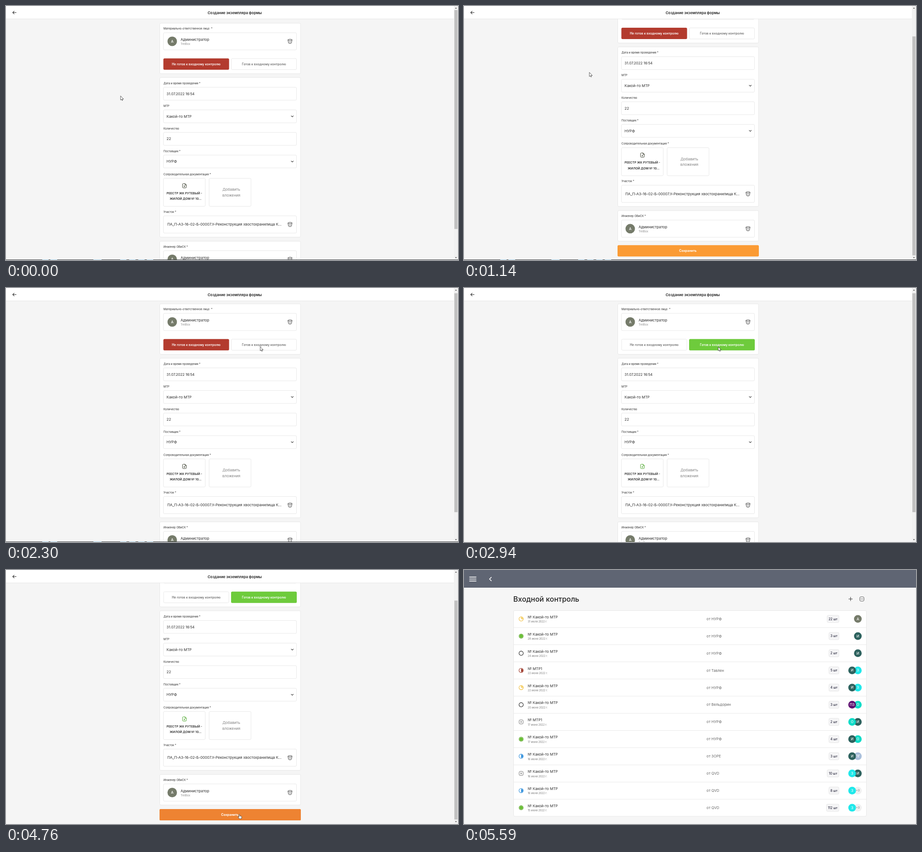
Recreate the animation shown at these times as an HTML page. Size 998 by 561 pixels, loop 5620 ms.

```html
<!DOCTYPE html>
<html lang="ru">
<head>
<meta charset="utf-8">
<style>
html, body { margin: 0; width: 100%; height: 100%; overflow: hidden; background: #f5f5f5; }
svg { display: block; width: 998px; height: 561px; font-family: Inter, "Open Sans", sans-serif; }
</style>
</head>
<body>
<svg id="stage" viewBox="0 0 998 561"></svg>
<script>
const LOOP = 5620, RED = '#b33b2e', GREEN = '#6ecb3c', INK = '#2b2b2b', GREY = '#808080';

// Drawing helpers; y of a text is the middle of its capitals
const text = (x, y, str, size = 8, fill = INK, weight = 400, anchor = 'start') =>
  `<text x="${x}" y="${y + size * .36}" font-size="${size}" fill="${fill}" font-weight="${weight}" text-anchor="${anchor}">${str}</text>`;
const mid = (x, y, str, size, fill, weight) => text(x, y, str, size, fill, weight, 'middle');
const rect = (x, y, w, h, fill, extra = '') =>
  `<rect x="${x}" y="${y}" width="${w}" height="${h}" fill="${fill}" ${extra}/>`;
const box = (x, y, w, h, fill = '#fff', stroke = '#e2e2e2', r = 2.5) =>
  rect(x + .5, y + .5, w - 1, h - 1, fill, `stroke="${stroke}" stroke-width=".8" rx="${r}"`);
const line = (d, stroke = INK, width = 1, fill = 'none') =>
  `<path d="${d}" fill="${fill}" stroke="${stroke}" stroke-width="${width}" stroke-linecap="round" stroke-linejoin="round"/>`;
const disc = (x, y, r, fill, extra = '') => `<circle cx="${x}" cy="${y}" r="${r}" fill="${fill}" ${extra}/>`;
const at = (x, y, body) => `<g transform="translate(${x} ${y})">${body}</g>`;
const layer = (id, body) => `<g id="${id}">${body}</g>`;

// Form page
const label = (y, str) => text(347.8, y, str, 6);
const chevron = y => line(`M629.8 ${y - 1.1}l2.3 2.3 2.3-2.3`, '#333', 1.1);
const field = (y, str) => box(347, y, 295, 29.5) + text(354.6, y + 14.7, str, str.includes(':') ? 7.8 : 8);
const trash = y => at(627, y, line('M-4.6-3.3C-4.6-5.2 4.6-5.2 4.6-3.3S-4.6-1.4-4.6-3.3L-3.3 3.6C-3 5.2 3 5.2 3.3 3.6L4.6-3.3', '#444', .9, '#eee')
  + line('M-1.4 0l.3 3M1.4 0l-.3 3', '#777', .6));
const person = y => box(347, y - 19.5, 295, 39) + disc(367, y, 10.5, '#757b6a') + mid(367, y, 'А', 8, '#fff', 500)
  + text(385.4, y - 3.8, 'Администратор', 8.2) + text(385.4, y + 6.2, 'TrelBox', 6, '#8c8c8c') + trash(y);
const choice = (x, fill, id, str) => box(x, 115.5, 145, 25.5) + mid(x + 72.5, 128.4, str, 6.95, '#707070', 600)
  + layer(id, rect(x, 115.7, 145, 25, fill, 'rx="2.5"') + mid(x + 72.5, 128.4, str, 6.95, '#fff', 600));
const docIcon = line('M-1-4.8h2.4L4.2-2v5a1.8 1.8 0 0 1-1.8 1.8h-4.8A1.8 1.8 0 0 1-4.2 3v-6a1.8 1.8 0 0 1 1.8-1.8zM1.2-4.6v2.8h2.8M-1.3-.2l2.6 2.8M1.3-.2l-2.6 2.8', 'currentColor', 1);

const form =
  box(339, 37.5, 312, 112.5) + label(50, 'Материально-ответственное лицо&#160; *') + person(78)
  + choice(347.5, RED, 'notReady', 'Не готов к входному контролю')
  + choice(497, GREEN, 'ready', 'Готов к входному контролю')
  + box(339, 157.5, 312, 353.5)
  + label(170.5, 'Дата и время проведения *') + field(179, '31.07.2022 16:54')
  + label(220.5, 'МТР') + field(229, 'Какой-то МТР') + chevron(243.7)
  + label(270.5, 'Количество') + field(278.7, '22')
  + label(320.5, 'Поставщик *') + field(328.7, 'НУРФ') + chevron(343.4)
  + label(371.5, 'Сопроводительная документация *')
  + box(347, 380, 93.5, 63) + layer('doc', at(394, 397, docIcon))
  + mid(393.8, 413.3, 'РЕЕСТР ЖК РУТЕВЫЙ -', 6.7, INK, 600) + mid(396.5, 426, 'ЖИЛОЙ ДОМ № 10...', 6.7, INK, 600)
  + box(448, 380, 93.5, 63) + mid(497.6, 405.3, 'Добавить', 8.2, GREY) + mid(497.6, 418, 'вложения', 8.2, GREY)
  + label(455, 'Участок *') + box(347, 463, 295, 39)
  + text(356.2, 482.6, 'ПА_П-АЗ-16-02-Б-00007.У-Реконструкция хвостохранилища К...', 7.96) + trash(482.5)
  + box(339, 519, 312, 68.5) + label(531.8, 'Инженер ОВиСК *') + person(559.5)
  + rect(339, 596, 312, 25, '#fb9b34', 'rx="2.5"') + rect(339, 596, 312, 25, '#ee8332', 'rx="2.5" id="pressed"')
  + mid(494.4, 608.4, 'Сохранить', 7.05, '#fff', 700);

const header = rect(0, 0, 989, 28.5, '#fff') + rect(0, 28, 989, .8, '#e4e4e4')
  + line('M22.5 14.5h-7.6M18 11.3l-3.2 3.2 3.2 3.2', '#333', 1.1)
  + mid(505, 14.8, 'Создание экземпляра формы', 8, '#222', 600);
const scrollbar = rect(989, 0, 9, 561, '#f1f1f1') + rect(990, 9, 7, 483.5, '#c1c1c1', 'id="thumb"')
  + '<path d="M991.5 5.7h4l-2-2.4zM991.5 554.8h4l-2 2.4z" fill="#555"/>';
const taskbar = rect(0, 560, 998, 1, '#3c3f42')
  + [[80, 14], [98, 15], [193, 18], [252, 14], [272, 14], [292, 14], [311, 14]].map(([x, w]) => rect(x, 560, w, 1, '#a8d3ec')).join('');

// List page
const tones = { А: '#757b6a', И: '#2d625e', З: '#20e8ea', О: '#10dcc8', ПЗ: '#5e0f70', ПГ: '#a9bfdb', '+3': '#f0f0f0' };
const face = (x, y, who) => disc(x, y, 8.5, tones[who])
  + (who == '+3' ? mid(x, y, who, 6, '#666') : mid(x, y, who, 7.5, '#fff', 500));
const ring = (color, fill = '#fff') => disc(0, 0, 4.7, fill, `stroke="${color}" stroke-width="1.1"`);
const half = color => ring(color) + `<path d="M0-3.8A3.8 3.8 0 0 1 0 3.8z" fill="${color}"/>`;
const marks = {
  quarter: ring('#f0bd3a') + line('M0-4.6V0h4.6', '#f0bd3a') + '<path d="M0-4A4 4 0 0 1 4 0H0z" fill="#f7d778"/>',
  done: ring('#69ab3d') + disc(0, 0, 3.8, '#69bf35'),
  empty: ring('#222'),
  red: half('#9c3526'),
  blue: half('#2f8fdc'),
  cross: box(-5, -5, 10, 10, '#fff', '#555') + line('M-1.6-1.6l3.2 3.2M1.6-1.6l-3.2 3.2', '#555', .9)
};
const some = 'Какой-то МТР';
const rows = [
  ['quarter', some, '31 июля', 'НУРФ', 22, 'А'],
  ['done', some, '28 июня', 'НУРФ', 3, 'И'],
  ['empty', some, '24 июня', 'НУРФ', 2, 'И'],
  ['red', 'МТР1', '22 июня', 'Тавлен', 5, 'И', 'З'],
  ['quarter', some, '22 июня', 'НУРФ', 4, 'И', 'З'],
  ['empty', some, '20 июня', 'Вельдорин', 3, 'ПЗ', 'О'],
  ['cross', 'МТР1', '17 июня', 'НУРФ', 2, 'О', 'И'],
  ['done', some, '17 июня', 'НУРФ', 4, 'И', 'О'],
  ['blue', some, '16 июня', 'ЗОРЕ', 3, 'И', 'ПГ'],
  ['cross', some, '16 июня', 'QVD', 10, 'З', 'И'],
  ['blue', some, '16 июня', 'QVD', 8, 'З', '+3'],
  ['done', some, '15 июня', 'QVD', 112, 'З', '+3']
];
const row = ([mark, name, date, from, count, first, second], i) => {
  const y = 108 + i * 37.92, w = count > 99 ? 28.5 : count > 9 ? 27 : 23;
  return (i ? rect(109.5, y - 19.3, 779, .8, '#e4e4e4') : '') + at(126.2, y, marks[mark])
    + text(140.8, y - 4, '№ ' + name) + text(140.8, y + 6.2, date + ' 2022 г.', 5.7, '#777')
    + text(535.6, y, 'от ' + from, 8, '#666')
    + box(828.3 - w, y - 8.5, w, 17, '#f5f5f6') + mid(828.3 - w / 2, y, count + ' шт', 7, '#24243a', 500)
    + (second ? face(869.6, y, second) + face(857, y, first) : face(869.6, y, first));
};
const list = rect(0, 0, 998, 561, '#f6f6f6') + rect(0, 0, 998, 39, '#5f6573')
  + line('M12.3 15.6h14.4M12.3 20h14.4M12.3 24.4h14.4', '#fff', 1.6) + line('M60.3 16.2L56.3 20l4 3.8', '#fff', 1.6)
  + text(108.8, 64.3, 'Входной контроль', 16, '#222', 500)
  + line('M849.6 64h8M853.6 60v8', '#333', 1)
  + box(873.3, 58.8, 10.4, 10.4, 'none', '#333') + [876.3, 878.5, 880.7].map(x => disc(x, 64, .7, '#333')).join('')
  + box(109, 89, 780, 455.5) + rows.map(row).join('');

const arrow = line('M0 0V8.8L2.1 7l1.4 2.9 1.3-.6-1.3-2.8h2.7z', '#333', .8, '#fff');
const hand = line('M-.9 5.4V.7C-.9-.5.9-.5.9.7v2.7l3.3.7c.8.2 1 .7.9 1.4L4.5 9.6H.2L-2.6 6.3c-.5-.9.7-1.7 1.7-.9z', '#333', .8, '#fff');

const stage = document.getElementById('stage');
stage.innerHTML = rect(0, 0, 998, 561, '#f5f5f5') + layer('form', form) + header + scrollbar + layer('taskbar', taskbar)
  + layer('arrow', arrow) + layer('hand', hand) + layer('list', list);
const $ = id => document.getElementById(id);

// Motion: keys are [time, ...values], eased between neighbours
const ease = p => p < .5 ? 2 * p * p : 1 - 2 * (1 - p) ** 2;
const track = (keys, t) => {
  const i = keys.findIndex(k => k[0] > t);
  if (i < 1) return keys.at(i).slice(1);
  const a = keys[i - 1], b = keys[i], p = ease((t - a[0]) / (b[0] - a[0]));
  return a.slice(1).map((v, j) => v + (b[j + 1] - v) * p);
};
const ramp = (from, to, t) => ease(Math.min(1, Math.max(0, (t - from) / (to - from))));

const scrollKeys = [[300, 0], [570, 68], [1125, 68], [1450, 3], [3190, 3], [3490, 68]];
const cursorKeys = [[20, 253, 199], [330, 276.8, 147], [1680, 276.8, 147], [2210, 561.3, 130],
  [2935, 561.3, 130], [3490, 534, 468], [3550, 532.8, 476], [3660, 532.8, 476], [4070, 515.3, 539.8]];

const show = (id, on) => $(id).setAttribute('opacity', +on);

function draw() {
  const t = performance.now() % LOOP;
  const [scroll] = track(scrollKeys, t), [x, y] = track(cursorKeys, t);
  const picked = ramp(2300, 2700, t), overSave = y > 528;
  $('form').setAttribute('transform', `translate(0 ${-scroll})`);
  $('thumb').setAttribute('y', 9 + scroll * .86);
  show('notReady', 1 - picked);
  show('ready', picked);
  $('doc').setAttribute('color', picked > .5 ? '#4fa82f' : '#3c4030');
  show('pressed', ramp(4130, 4650, t));
  show('taskbar', t < 2330);
  for (const id of ['arrow', 'hand']) $(id).setAttribute('transform', `translate(${x} ${y})`);
  show('arrow', !overSave);
  show('hand', overSave);
  show('list', ramp(4830, 5050, t));
  requestAnimationFrame(draw);
}
draw();
</script>
</body>
</html>
```
